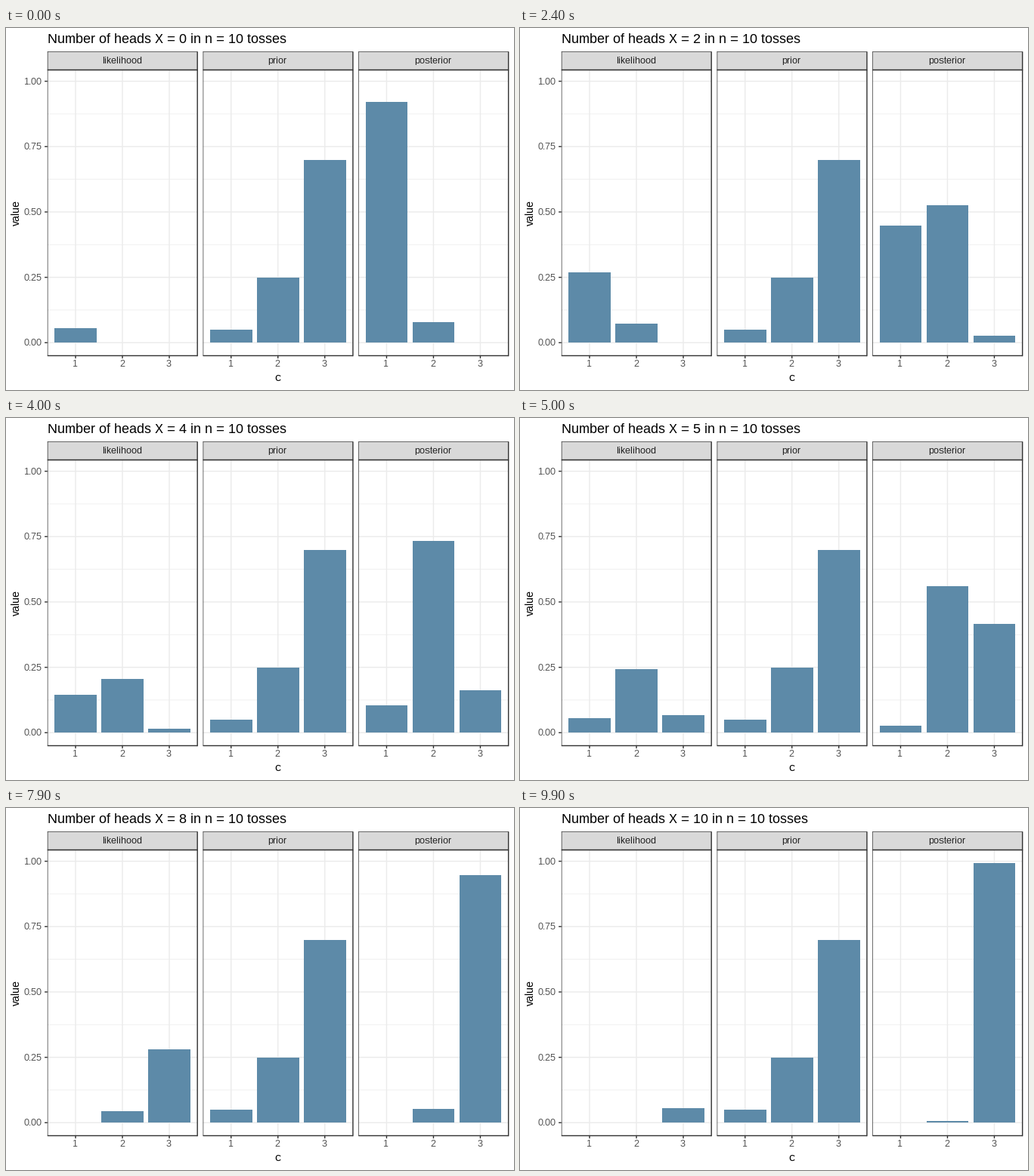
Animation of 672x480 px, one loop 10 s. Source, as a matplotlib script:

```python
from math import comb

import matplotlib.pyplot as plt
import numpy as np
from matplotlib.animation import FuncAnimation
from matplotlib.patches import Rectangle

# Whole-pixel glyph advances
plt.rcParams.update({
    "font.family": "Liberation Sans",
    "text.hinting": "native",
    "text.hinting_factor": 1,
})

W, H, DPI = 672, 480, 96
FRAMES, INTERVAL = 100, 100
TOSSES = 10

LEFT, PANEL_W, GAP = 54.8, 198.4, 7.33
STRIP_TOP, TOP, BOTTOM = 31.3, 55.5, 434.5
LINE = 1.42
UNIT = PANEL_W / 3.2

BAR, GRID, EDGE, STRIP = "#5d8aa8", "#ebebeb", "#333333", "#d9d9d9"
TICK_TEXT, STRIP_TEXT = "#4d4d4d", "#1a1a1a"

# Binomial model with three candidate coins
bias = np.array([0.25, 0.5, 0.75])
prior = np.array([0.05, 0.25, 0.7])
heads = np.arange(TOSSES + 1)
ways = np.array([comb(TOSSES, k) for k in heads])
likelihood = ways[:, None] * bias ** heads[:, None] * (1 - bias) ** (TOSSES - heads[:, None])
joint = likelihood * prior
posterior = joint / joint.sum(axis=1, keepdims=True)
panels = {
    "likelihood": likelihood,
    "prior": np.tile(prior, (TOSSES + 1, 1)),
    "posterior": posterior,
}
key_frames = np.round(1 + heads * (FRAMES - 1) / TOSSES) - 1

y_max = posterior.max()
SCALE = (BOTTOM - TOP) / (1.1 * y_max)
ZERO = BOTTOM - 0.05 * y_max * SCALE

fig = plt.figure(figsize=(W / DPI, H / DPI), dpi=DPI, facecolor="white")
ax = fig.add_axes([0, 0, 1, 1])
ax.set(xlim=(0, W), ylim=(H, 0))
ax.axis("off")


def y_pos(value):
    return ZERO - value * SCALE


def fill(x0, y0, x1, y1, color, z=1, snap=False):
    rect = Rectangle((x0, y0), x1 - x0, y1 - y0, fc=color, lw=0, zorder=z)
    rect.set_snap(snap)
    return ax.add_patch(rect)


def hline(x0, x1, y, color, width=LINE, z=1):
    fill(x0, y - width / 2, x1, y + width / 2, color, z)


def vline(x, y0, y1, color, width=LINE, z=1):
    fill(x - width / 2, y0, x + width / 2, y1, color, z)


def label(x, y, text, size, color="black", **kw):
    return ax.text(x, y, text, size=size, color=color, va="baseline", zorder=5, **kw)


def border(x0, y0, x1, y1):
    # Left and top strokes are clipped to their inner half
    half = LINE / 2
    fill(x0, y0, x0 + half, y1, EDGE, 4)
    fill(x0, y0, x1, y0 + half, EDGE, 4)
    vline(x1, y0, y1 + half, EDGE, z=4)
    hline(x0, x1, y1, EDGE, z=4)


def draw_panel(left, name):
    right = left + PANEL_W
    for v in np.arange(0.125, 1, 0.25):
        hline(left, right, y_pos(v), GRID, LINE / 2)
    for v in np.arange(0, 1.1, 0.25):
        hline(left, right, y_pos(v), GRID)

    bars = []
    for c in (1, 2, 3):
        x = left + (c - 0.4) * UNIT
        vline(x, TOP, BOTTOM, GRID)
        vline(x, BOTTOM, BOTTOM + 3.67, EDGE)
        label(x - 0.6, 449, str(c), 8.8, TICK_TEXT, ha="center")
        bars.append(fill(x - 0.45 * UNIT, ZERO, x + 0.45 * UNIT, ZERO, BAR, 3, True))

    border(left, TOP, right, BOTTOM)
    fill(left, STRIP_TOP, right, TOP, STRIP)
    border(left, STRIP_TOP, right, TOP)
    label((left + right) / 2 - 0.6, 47, name, 8.8, STRIP_TEXT, ha="center")
    return bars


bars = {
    name: draw_panel(LEFT + i * (PANEL_W + GAP), name)
    for i, name in enumerate(panels)
}

for v in np.arange(0, 1.1, 0.25):
    hline(LEFT - 3.67, LEFT, y_pos(v), EDGE)
    label(24, round(y_pos(v) + 4.2), f"{v:.2f}", 8.8, TICK_TEXT)

label(359.2, 468, "c", 11, ha="center")
label(18, 262, "value", 11, rotation=90, rotation_mode="anchor")
title = label(55, 20, "", 13.2)


def update(i):
    shown = round(i * TOSSES / (FRAMES - 1))
    title.set_text(f"Number of heads X = {shown} in n = {TOSSES} tosses")
    for name, table in panels.items():
        for bar, column in zip(bars[name], table.T):
            bar.set_height(-SCALE * np.interp(i, key_frames, column))
    return [title, *sum(bars.values(), [])]


anim = FuncAnimation(fig, update, frames=FRAMES, interval=INTERVAL, repeat=True, blit=False)
plt.show()
```
